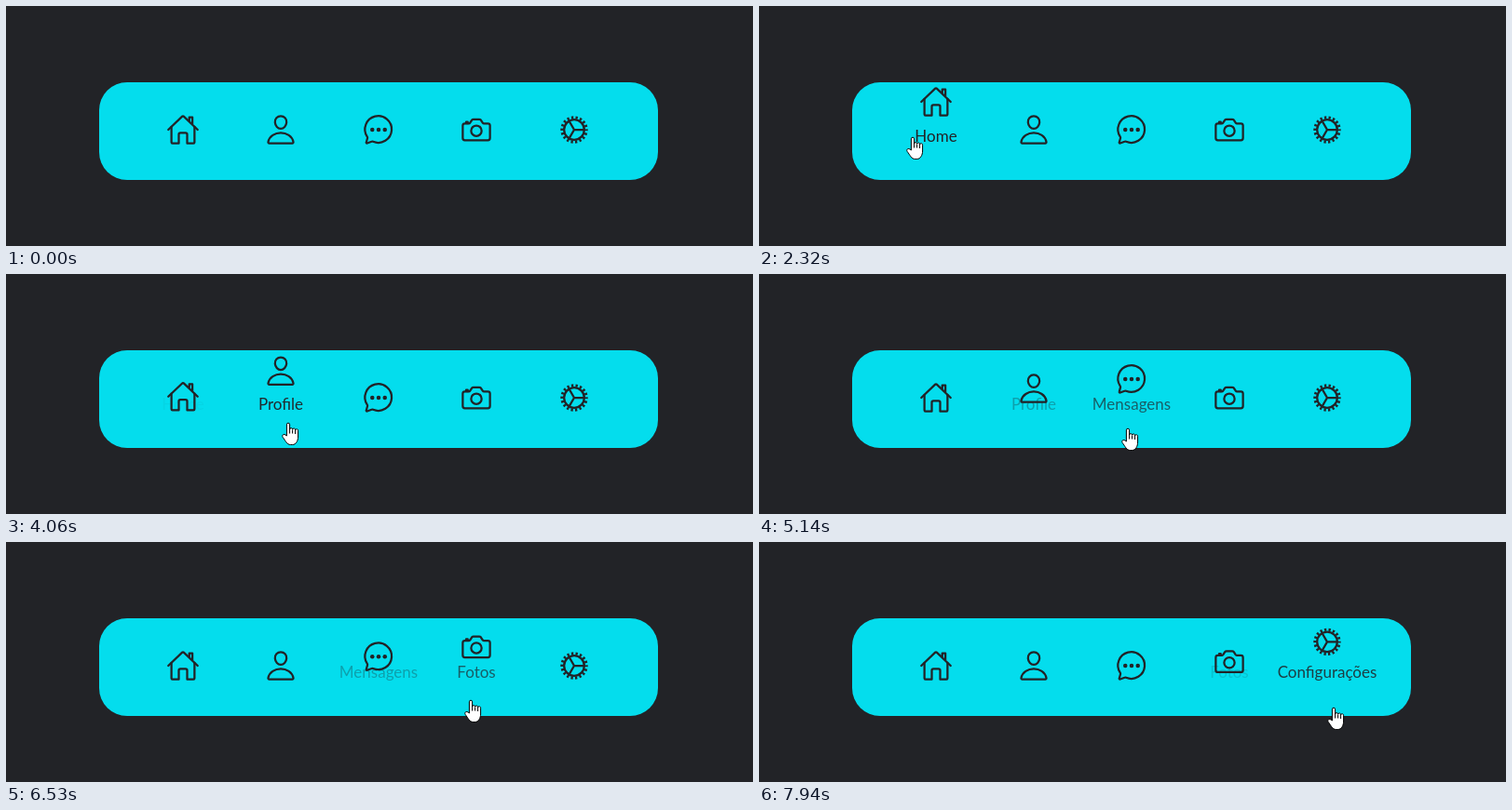
Animation of 802 by 258 pixels, one loop 8000 ms. Source, as an HTML page:

```html
<!DOCTYPE html>
<html lang="pt">
<head>
<meta charset="utf-8">
<title>Menu</title>
<style>
  @property --up { syntax: "<number>"; inherits: true; initial-value: 0; }

  html, body { margin: 0; width: 100%; height: 100%; overflow: hidden; background: #222327; }
  body > svg { display: block; width: 100%; height: 100%; }

  .item { animation: 8s ease infinite; }
  .icon {
    transform: translateY(calc(var(--up) * -30px));
    fill: none; stroke: #222327; stroke-width: 32; stroke-linecap: round; stroke-linejoin: round;
  }
  .icon .solid { fill: #222327; stroke: none; }
  .icon .teeth { stroke-width: 44; stroke-linecap: butt; }
  .item text {
    opacity: var(--up);
    font: 17px Lato, sans-serif; text-anchor: middle; fill: #222327;
  }

  .home { animation-name: home; }
  .profile { animation-name: profile; }
  .messages { animation-name: messages; }
  .photos { animation-name: photos; }
  .settings { animation-name: settings; }

  @keyframes home {
    0%, 18.15% { --up: 0; }
    28.15%, 43.3% { --up: 1; }
    53.3%, 100% { --up: 0; }
  }
  @keyframes profile {
    0%, 43.3% { --up: 0; }
    53.3%, 60.35% { --up: 1; }
    70.35%, 100% { --up: 0; }
  }
  @keyframes messages {
    0%, 60.35% { --up: 0; }
    70.35%, 77.7% { --up: 1; }
    87.7%, 100% { --up: 0; }
  }
  /* The loop cuts the last lift short, so its curve is the first part of "ease". */
  @keyframes photos {
    0%, 77.7% { --up: 0; }
    87.7% { --up: 1; }
    93.7% { --up: 1; animation-timing-function: cubic-bezier(.316, .088, .38, .742); }
    100% { --up: .094; }
  }
  @keyframes settings {
    0% { --up: 0; }
    93.7% { --up: 0; animation-timing-function: cubic-bezier(.316, .088, .38, .742); }
    100% { --up: .906; }
  }

  .pointer { animation: travel 8s linear infinite; fill: #fff; stroke: #000; stroke-linejoin: round; }
  .arrow { animation: arrow 8s step-end infinite; }
  .hand { animation: hand 8s step-end infinite; }

  @keyframes arrow { 0% { opacity: 0; } 12.4% { opacity: 1; } 18.15%, 100% { opacity: 0; } }
  @keyframes hand { 0% { opacity: 0; } 18.15%, 100% { opacity: 1; } }
  @keyframes travel {
    0%, 12.4% { transform: translate(42px, 6px); }
    16.2% { transform: translate(96px, 107px); }
    18.15% { transform: translate(138px, 128px); animation-timing-function: ease-out; }
    20.5% { transform: translate(165px, 141px); }
    39.9% { transform: translate(165px, 141px); animation-timing-function: ease-in; }
    43.25% { transform: translate(241px, 148px); animation-timing-function: ease-out; }
    46.5% { transform: translate(303px, 160px); }
    58.4% { transform: translate(303px, 160px); animation-timing-function: ease-in; }
    60.35% { transform: translate(348px, 163px); animation-timing-function: ease-out; }
    63.2% { transform: translate(396px, 166px); }
    75.9% { transform: translate(396px, 166px); animation-timing-function: ease-in; }
    77.7% { transform: translate(452px, 168px); animation-timing-function: ease-out; }
    80.5% { transform: translate(499px, 170px); }
    91.75% { transform: translate(499px, 170px); animation-timing-function: ease-in; }
    93.7% { transform: translate(558px, 174px); animation-timing-function: ease-out; }
    96.5%, 100% { transform: translate(617px, 178px); }
  }
</style>
</head>
<body>
<svg viewBox="0 0 802 258">
  <rect x="100" y="82" width="600" height="105" rx="30" fill="#04dded"/>

  <g transform="translate(190 133)"><g class="item home">
    <g class="icon"><svg x="-18" y="-18" width="36" height="36" viewBox="0 0 512 512">
      <path d="M80 212V448a16 16 0 0 0 16 16h96V328a24 24 0 0 1 24-24h80a24 24 0 0 1 24 24V464h96a16 16 0 0 0 16-16V212"/>
      <path d="M480 256L267 52c-5-5-17-5-22 0L32 256M400 179V64h-48v69"/>
    </svg></g>
    <text y="13">Home</text>
  </g></g>

  <g transform="translate(295 133)"><g class="item profile">
    <g class="icon"><svg x="-18" y="-18" width="36" height="36" viewBox="0 0 512 512">
      <path d="M344 144c-4 53-44 96-88 96s-84-43-88-96c-4-55 35-96 88-96s92 42 88 96z"/>
      <path d="M256 304c-87 0-175 48-192 139-2 11 5 21 16 21h352c11 0 18-10 16-21C431 352 343 304 256 304z"/>
    </svg></g>
    <text y="13">Profile</text>
  </g></g>

  <g transform="translate(400 133)"><g class="item messages">
    <g class="icon"><svg x="-18" y="-18" width="36" height="36" viewBox="0 0 512 512">
      <path d="M87 380c2-6-2-13-6-19A204 204 0 1 1 173 438c-8-3-16-3-23 0l-68 25c-9 3-17-3-14-12z"/>
      <g class="solid"><circle cx="160" cy="256" r="32"/><circle cx="256" cy="256" r="32"/><circle cx="352" cy="256" r="32"/></g>
    </svg></g>
    <text y="13">Mensagens</text>
  </g></g>

  <g transform="translate(505 133)"><g class="item photos">
    <g class="icon"><svg x="-18" y="-18" width="36" height="36" viewBox="0 0 512 512">
      <path d="M351 149l-27-42c-6-7-13-11-22-11h-92c-9 0-16 4-22 11l-27 42c-5 6-12 11-21 11H80a32 32 0 0 0-32 32v192a32 32 0 0 0 32 32h352a32 32 0 0 0 32-32V192a32 32 0 0 0-32-32h-59c-9 0-17-5-22-11z"/>
      <path d="M124 158v-22h-24v22"/>
      <circle cx="256" cy="272" r="80"/>
    </svg></g>
    <text y="13">Fotos</text>
  </g></g>

  <g transform="translate(610 133)"><g class="item settings">
    <g class="icon"><svg x="-18" y="-18" width="36" height="36" viewBox="0 0 512 512">
      <circle cx="256" cy="256" r="154"/>
      <circle class="teeth" cx="256" cy="256" r="187" pathLength="36" stroke-dasharray="1 1" stroke-dashoffset=".5"/>
      <path d="M256 256H410M256 256L179 123M256 256L179 389"/>
    </svg></g>
    <text y="13">Configurações</text>
  </g></g>

  <g class="pointer">
    <path class="arrow" d="M0 0V16L4 12.5 6.5 18.5 9 17.5 6.5 11.5H11.5Z"/>
    <g class="hand">
      <path d="M-1.6 14V1.8a1.6 1.6 0 0 1 3.2 0V7a1.5 1.5 0 0 1 3 .2a1.5 1.5 0 0 1 3 .7a1.5 1.5 0 0 1 3 .9V15c0 4-2.2 8.5-6 8.5H2.5C-1.500 23.500-3 19-5.800 15.500c-1.500-2.500 1.200-4.500 4.200-1.500z"/>
      <path fill="none" d="M1.600 7v4.500M4.600 7.500v4M7.600 8v4"/>
    </g>
  </g>
</svg>
</body>
</html>
```
